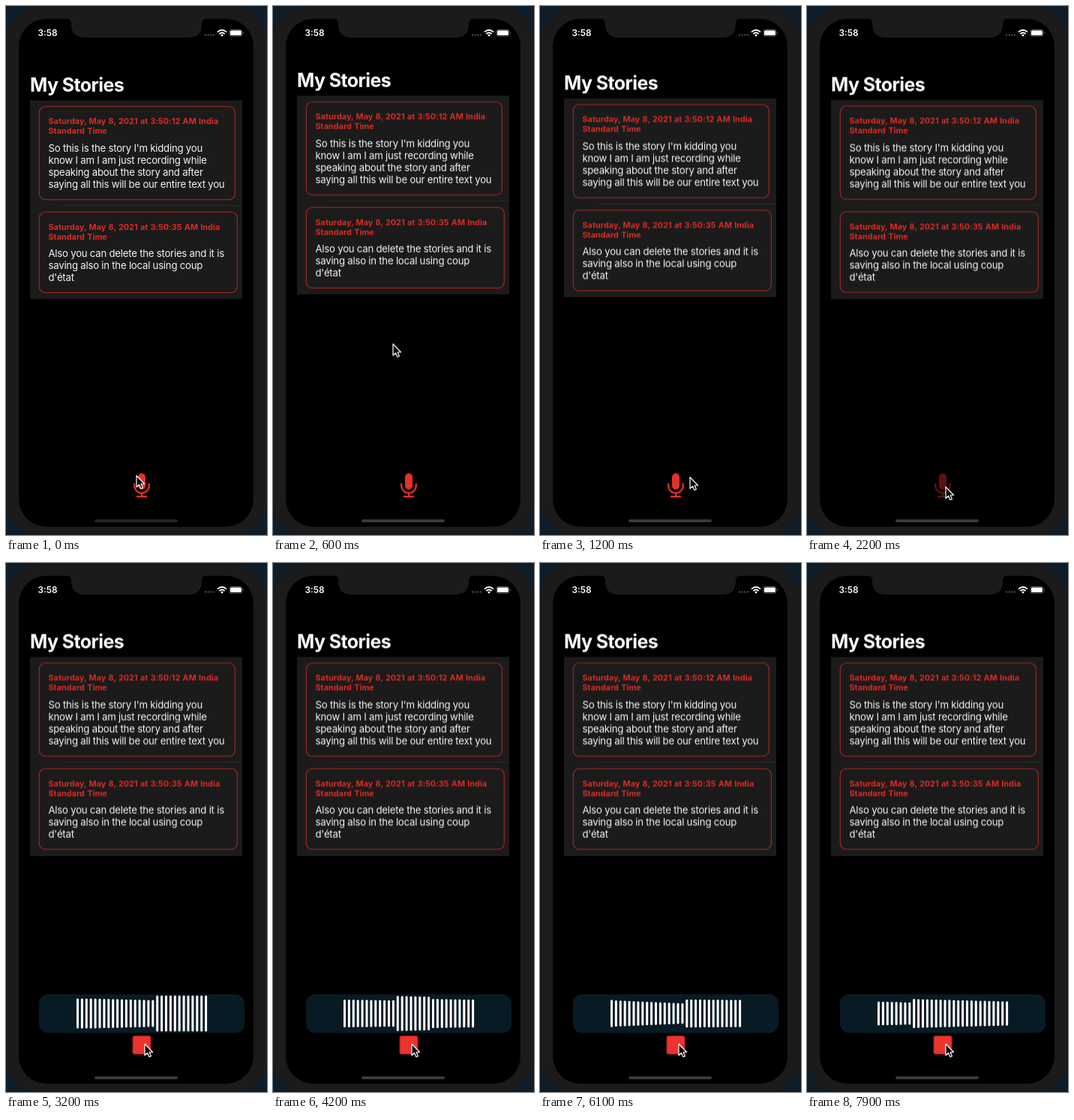
Write an HTML page that moves like this. It is 348x704 px and loops after 8000 ms.

```html
<!DOCTYPE html>
<html lang="en">
<head>
<meta charset="utf-8">
<title>My Stories</title>
<style>
  html, body { margin: 0; width: 100%; height: 100%; overflow: hidden; background: #0f1d29; }
  svg { display: block; width: 100%; height: 100%; }
  text { font-family: Inter, "Open Sans", sans-serif; fill: #fff; white-space: pre; }
  .time { font-size: 11.8px; font-weight: 600; }
  .large { font-size: 25px; font-weight: 700; letter-spacing: -.6px; }
  .small { font-size: 12.8px; font-weight: 600; letter-spacing: -.3px; text-anchor: middle; }
  .date { font-size: 10.8px; font-weight: 700; letter-spacing: .05px; word-spacing: .6px; fill: #d92c24; }
  .body { font-size: 13.2px; letter-spacing: -.23px; fill: #f4f4f4; }
  .card { fill: none; stroke: #b0261f; stroke-width: 1.1; }

  #scroll, #bar, #large, #cursor, #mic, #rec, #home { animation: 8s linear infinite both; }
  #scroll { animation-name: scroll; }
  #bar { animation-name: bar; }
  #large { animation-name: large; }
  #cursor { animation-name: cursor; }
  #mic { animation-name: mic; }
  #rec { animation-name: rec; }
  #home { animation-name: home; }

  @keyframes scroll {
    0%, 6.875% { transform: translateY(0); }
    10%, 11.5% { transform: translateY(-30.4px); }
    12.5% { transform: translateY(-19px); }
    13.75% { transform: translateY(-8px); }
    15% { transform: translateY(-2.6px); }
    16.25% { transform: translateY(-1px); }
    17.5%, 100% { transform: translateY(-.5px); }
  }
  @keyframes bar {
    0%, 8.75% { opacity: 0; }
    9.75%, 11.7% { opacity: 1; }
    12.7%, 100% { opacity: 0; }
  }
  @keyframes large {
    0%, 8.75% { opacity: 1; }
    9.75%, 11.7% { opacity: 0; }
    12.7%, 100% { opacity: 1; }
  }
  @keyframes cursor {
    0%, 3.75% { transform: translate(174px, 625px); }
    7.5% { transform: translate(160px, 450px); }
    11.25% { transform: translate(154px, 362px); }
    12.5% { transform: translate(163px, 430px); }
    15% { transform: translate(200px, 627px); }
    19% { transform: translate(196px, 638px); }
    24%, 100% { transform: translate(185px, 640px); }
  }
  @keyframes mic {
    0%, 26.2% { opacity: 1; }
    26.21%, 28.6% { opacity: .4; }
    32%, 100% { opacity: 0; }
  }
  @keyframes rec {
    0%, 28.6% { opacity: 0; }
    32.5%, 100% { opacity: 1; }
  }
  @keyframes home {
    0%, 3.74% { opacity: .65; }
    3.75%, 100% { opacity: 1; }
  }
</style>
</head>
<body>
<svg viewBox="0 0 348 704" preserveAspectRatio="none">
  <defs>
    <clipPath id="screen"><rect x="17" y="17" width="313" height="676" rx="37"/></clipPath>
  </defs>

  <rect width="348" height="704" fill="#0f1d29"/>
  <rect x="-1" y="-1" width="350" height="708" rx="52" fill="#1b1b1b"/>
  <rect x="17" y="17" width="313" height="676" rx="37" fill="#000"/>

  <g clip-path="url(#screen)">
    <g id="scroll">
      <text id="large" class="large" x="32" y="113.5">My Stories</text>
      <rect x="32" y="125.5" width="283" height="264.5" fill="#1b1b1b"/>
      <path d="M75 265.5H315" stroke="#2a2a2a"/>
      <rect class="card" x="44.3" y="133.7" width="261" height="124.1" rx="8"/>
      <rect class="card" x="44.3" y="274.3" width="264" height="107.2" rx="8"/>
      <text class="date" x="56.5" y="157">Saturday, May 8, 2021 at 3:50:12 AM India</text>
      <text class="date" x="56.5" y="170.3">Standard Time</text>
      <text class="date" x="56.5" y="297.5">Saturday, May 8, 2021 at 3:50:35 AM India</text>
      <text class="date" x="56.5" y="310.8">Standard Time</text>
      <text class="body" x="56.5" y="193.5">So this is the story I'm kidding you</text>
      <text class="body" x="56.5" y="209.8">know I am I am just recording while</text>
      <text class="body" x="56.5" y="226.1">speaking about the story and after</text>
      <text class="body" x="56.5" y="242.4">saying all this will be our entire text you</text>
      <text class="body" x="56.5" y="333.8">Also you can delete the stories and it is</text>
      <text class="body" x="56.5" y="350.1">saving also in the local using coup</text>
      <text class="body" x="56.5" y="366.4">d'état</text>
    </g>

    <g id="bar">
      <rect x="17" y="17" width="313" height="70" fill="#101010"/>
      <text class="small" x="173" y="74.5">My Stories</text>
    </g>
  </g>

  <!-- notch and status row -->
  <path d="M80 16Q87 17 87 24Q87 42 105 42H243Q261 42 261 24Q261 17 268 16Z" fill="#1b1b1b"/>
  <text class="time" x="42.5" y="40">3:58</text>
  <path d="M265 38.5h13" stroke="#555" stroke-width="2" stroke-dasharray="2 1.6"/>
  <g fill="none" stroke="#fff" stroke-width="1.9">
    <path d="M282 34.6Q288 29.4 294 34.6"/>
    <path d="M284.3 37.1Q288 33.9 291.7 37.1"/>
  </g>
  <path d="M286 38.6Q288 37 290 38.6L288 40.7Z" fill="#fff"/>
  <rect x="297.9" y="31.4" width="17" height="8.8" rx="2.6" fill="none" stroke="#777" stroke-width=".8"/>
  <rect x="299" y="32.5" width="14.8" height="6.6" rx="1.6" fill="#fff"/>
  <path d="M316 34.2q1.6 1.6 0 3.2z" fill="#888"/>

  <rect id="home" x="118" y="683.3" width="111" height="3.6" rx="1.8" fill="#3c3c3c"/>

  <g id="mic" fill="none" stroke="#e5302a" stroke-width="2.2" stroke-linecap="round">
    <rect x="176" y="622" width="10" height="21.5" rx="5" fill="#e5302a" stroke="none"/>
    <path d="M171.2 636v2.3a9.8 9.8 0 0 0 19.6 0v-2.3M181 648v4.6M174.8 652.8h12.4"/>
  </g>

  <g id="rec">
    <rect x="44" y="574" width="274" height="51.5" rx="12" fill="#081a24"/>
    <g id="bars" fill="#fff"></g>
    <rect x="168.5" y="629" width="25" height="25" rx="3" fill="#b8241f"/>
    <rect x="170" y="630.3" width="22.2" height="22.4" rx="2" fill="#ec342e"/>
  </g>

  <g id="cursor">
    <path d="M0 0V15.2L3.5 12L5.9 17.3L8.4 16.2L6.1 11H10.6Z" fill="#000" stroke="#fff" stroke-width="1.2" stroke-linejoin="round"/>
  </g>
</svg>

<script>
  const LOOP = 8000, COUNT = 30, RATE = 0.0616, START = 2895, LIVE = 3200;
  const FULL = 48, QUIET = 20, MID = 599.5;

  // sounds: start time, bar height, fall per sample
  const sounds = [
    [0, 40, 0], [2950, 40, .3], [3250, 45, .4], [3700, 39, .17], [4060, 47, .25],
    [4300, 41, .3], [4700, 46, .35], [5050, 40, .25], [5600, 37.6, .1], [5825, 35.4, .5],
    [6130, 42, .35], [6500, 38, .3], [6850, 46, .4], [7150, 41, .2], [7400, 39, .31]
  ];

  function level(t) {
    const [at, height, fall] = sounds.filter(s => s[0] <= t).pop();
    return Math.max(QUIET, height - (t - at) * RATE * fall);
  }

  const group = document.getElementById("bars");
  const bars = Array.from({ length: COUNT }, (_, i) => {
    const bar = document.createElementNS("http://www.w3.org/2000/svg", "rect");
    bar.setAttribute("x", 94 + i * 5.9);
    bar.setAttribute("width", 3);
    bar.setAttribute("rx", 1.5);
    return group.appendChild(bar);
  });

  // samples overwrite the row from left to right, then wrap around
  function draw(t) {
    const last = t < LIVE ? -1 : Math.floor((t - START) * RATE) - 1;
    bars.forEach((bar, i) => {
      const k = last - ((last - i) % COUNT + COUNT) % COUNT;
      const h = k < 0 ? FULL : level(START + k / RATE);
      bar.setAttribute("y", MID - h / 2);
      bar.setAttribute("height", h);
    });
  }

  let zero;
  function tick(now) {
    zero ??= now;
    draw((now - zero) % LOOP);
    requestAnimationFrame(tick);
  }
  draw(0);
  requestAnimationFrame(tick);
</script>
</body>
</html>
```
